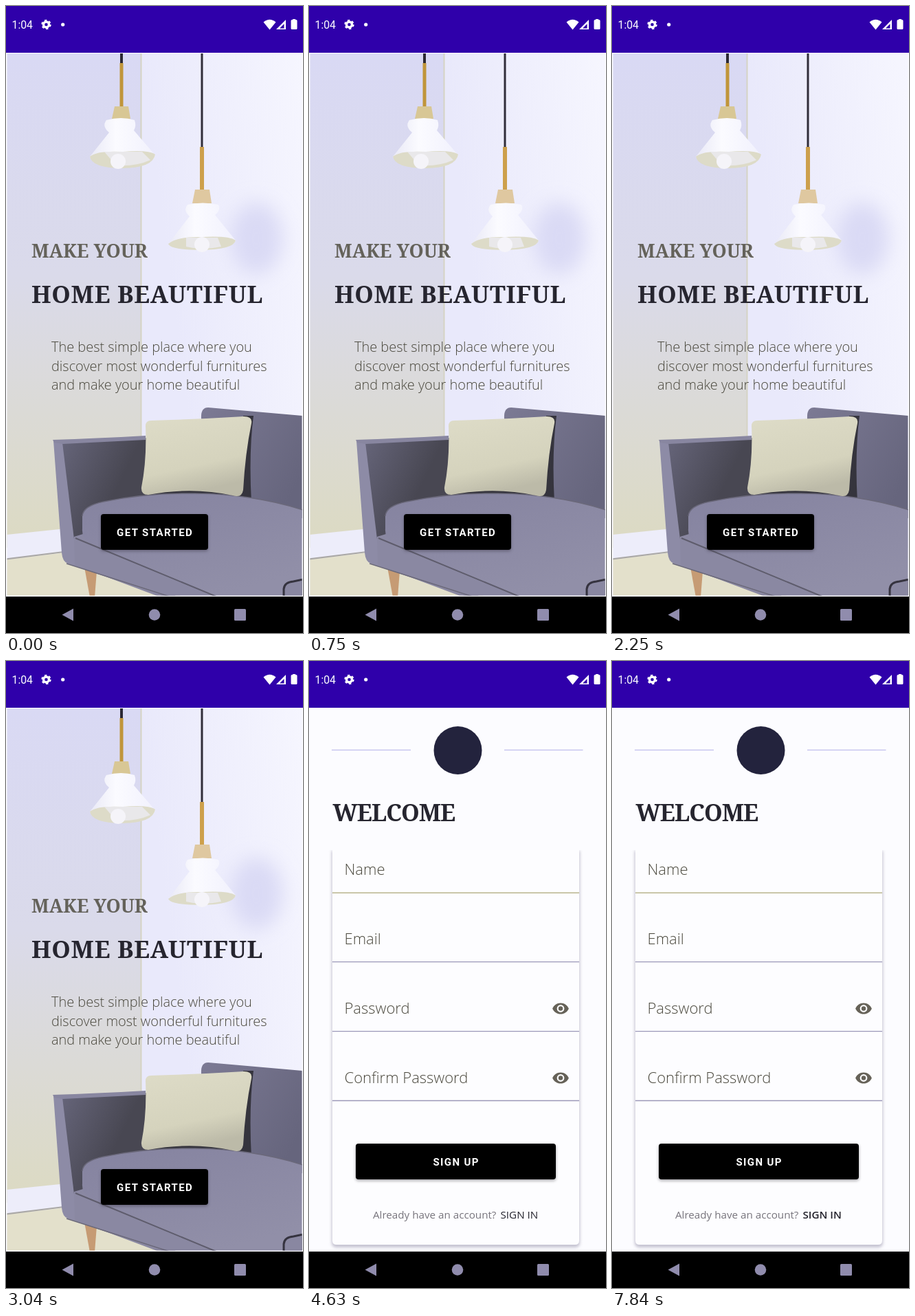
An HTML page that plays this animation: 432 px wide and 912 px high, repeating every 8000 ms.

```html
<!DOCTYPE html>
<html lang="en">
<head>
<meta charset="utf-8">
<title>Home decor app</title>
<style>
  html, body { margin: 0; width: 100%; height: 100%; overflow: hidden; background: #000; }
  svg { display: block; width: 100vw; height: 100vh; }

  .serif { font-family: "Noto Serif", serif; font-weight: 700; fill: #26252f; }
  .light { font-family: "Open Sans", sans-serif; font-weight: 300; fill: #4a483d; }
  .note { font: 400 15.2px "Open Sans", sans-serif; fill: #77747c; }
  .caps { font: 600 15px Roboto, sans-serif; letter-spacing: 1.4px; fill: #fff; text-anchor: middle; }
  .link { fill: #24232c; }

  .signup, .pressed, .bar, .thin, .bold { animation: 8s linear infinite; }
  .signup { animation-name: open; }
  .pressed { animation-name: press; }
  .bar { animation-name: bar; }
  .thin { animation-name: thin; }
  .bold { animation-name: bold; font-weight: 400; }
  .bold .link { font-weight: 600; }

  @keyframes open { 0%, 50% { opacity: 0; } 52%, 100% { opacity: 1; } }
  @keyframes press { 0%, 45.5% { opacity: 0; } 47%, 100% { opacity: 1; } }
  @keyframes bar {
    0%, 74.3% { opacity: 0; }
    74.4%, 91.5% { opacity: 1; }
    97.5%, 100% { opacity: 0; }
  }
  @keyframes thin { 0%, 75.4% { opacity: 1; } 75.5%, 100% { opacity: 0; } }
  @keyframes bold { 0%, 75.4% { opacity: 0; } 75.5%, 100% { opacity: 1; } }
</style>
</head>
<body>
<svg viewBox="0 0 432 912" preserveAspectRatio="none">
  <defs>
    <linearGradient id="wall" x2="0" y2="1">
      <stop offset="0" stop-color="#d9d9f4"/>
      <stop offset=".45" stop-color="#dadaea"/>
      <stop offset="1" stop-color="#dcdac2"/>
    </linearGradient>
    <linearGradient id="side" x2="1" y2="-.4">
      <stop offset="0" stop-color="#e9e9fb"/>
      <stop offset="1" stop-color="#f8f8ff"/>
    </linearGradient>
    <linearGradient id="arm" x2="1" y2=".6">
      <stop offset="0" stop-color="#66657a"/>
      <stop offset=".7" stop-color="#484752"/>
    </linearGradient>
    <linearGradient id="back" x2="1" y2=".6">
      <stop offset="0" stop-color="#7c7a94"/>
      <stop offset="1" stop-color="#66657d"/>
    </linearGradient>
    <linearGradient id="seat" x2=".6" y2="1">
      <stop offset="0" stop-color="#8583a0"/>
      <stop offset="1" stop-color="#918fa8"/>
    </linearGradient>
    <linearGradient id="pillow" x2=".3" y2="1">
      <stop offset="0" stop-color="#dedcc8"/>
      <stop offset=".7" stop-color="#d5d3bd"/>
      <stop offset="1" stop-color="#bcbaa8"/>
    </linearGradient>
    <linearGradient id="shade">
      <stop offset="0" stop-color="#e9e9f6"/>
      <stop offset=".4" stop-color="#fbfbff"/>
      <stop offset="1" stop-color="#f1f1fd"/>
    </linearGradient>
    <filter id="blur" x="-50%" y="-50%" width="200%" height="200%"><feGaussianBlur stdDeviation="14"/></filter>
    <filter id="soft" x="-10%" y="-10%" width="120%" height="130%"><feGaussianBlur stdDeviation="2.2"/></filter>
    <clipPath id="photo"><rect x="1.5" y="69" width="429" height="788.5"/></clipPath>
    <clipPath id="page"><rect y="68" width="432" height="791"/></clipPath>
    <g id="eye" fill="#666258">
      <path fill-rule="evenodd" transform="scale(1.08) translate(-12 -12)" d="M12 4.5C7 4.5 2.73 7.61 1 12c1.73 4.39 6 7.5 11 7.5s9.27-3.11 11-7.5c-1.73-4.39-6-7.5-11-7.5zM12 17a5 5 0 1 1 0-10 5 5 0 0 1 0 10z"/>
      <circle r="3.2"/>
    </g>
  </defs>

  <!-- welcome screen -->
  <rect y="68" width="432" height="791" fill="#fcfcff"/>
  <g clip-path="url(#photo)">
    <rect y="68" width="197" height="720" fill="url(#wall)"/>
    <rect x="196" y="68" width="236" height="720" fill="url(#side)"/>
    <path d="M196.5 68V640" stroke="#d5d3c4" stroke-width="2"/>
    <ellipse cx="364" cy="338" rx="38" ry="52" fill="#dadaf5" filter="url(#blur)"/>

    <!-- hanging lamps -->
    <path d="M168 69V84" stroke="#2b2833" stroke-width="4"/>
    <path d="M168 83V148" stroke="#c0953a" stroke-width="5"/>
    <path d="M158 146H178L181 164H154Z" fill="#d8c795"/>
    <path d="M146 166Q168 160 187 166Q190 174 186 181L217 217Q214 232 170 234Q124 232 122 219L150 184Q139 175 146 166Z" fill="url(#shade)"/>
    <path d="M122 219Q132 210 170 212Q208 209 217 216Q214 235 170 236Q125 236 122 219Z" fill="#dddbc8"/>
    <path d="M143 212H198L210 224Q188 234 160 232Z" fill="#e9e8ea"/>
    <circle cx="163" cy="226" r="11" fill="#f5f4f9"/>

    <path d="M285 69V206" stroke="#302d39" stroke-width="3"/>
    <path d="M285 205V269" stroke="#cda04c" stroke-width="6"/>
    <path d="M275 267H296L299 287H271Z" fill="#dfc8a0"/>
    <path d="M264 289Q286 284 309 289Q313 297 304 304L334 341Q331 353 285 355Q238 353 236 346L267 306Q257 297 264 289Z" fill="url(#shade)"/>
    <path d="M236 346Q249 335 285 336Q325 334 334 341Q331 354 285 355Q240 355 236 346Z" fill="#dddbc8"/>
    <path d="M262 337H308L313 350Q285 356 262 350Z" fill="#e9e8ea"/>
    <circle cx="285" cy="347" r="11" fill="#f5f4f9"/>

    <!-- floor -->
    <path d="M0 769L88 760V860H0Z" fill="#ededfa"/>
    <path d="M0 805L86 795L260 860H0Z" fill="#e3e0cb"/>
    <path d="M0 804.5L84 794" stroke="#aaa8a6" stroke-width="2"/>

    <!-- sofa -->
    <path d="M114 816L132 822L129 860H122Z" fill="#c69b74"/>
    <path d="M284 600Q283 584 294 584L432 596V745H284Z" fill="url(#back)"/>
    <path d="M345 596H360Q353 650 357 722L190 724V690L345 680Z" fill="#35343d"/>
    <path d="M69 632L84 635L112 770L250 860H232L90 811Q82 808 81 795Z" fill="#8d8ba6"/>
    <path d="M82 635L204 628V730L112 775H99Z" fill="url(#arm)"/>
    <path d="M68 631Q130 629 203 625V631L83 637L70 635Z" fill="#8886a0"/>
    <path d="M99 772L112 768L310 860H225L100 813Z" fill="#8a88a2"/>
    <path d="M111 742Q112 727 142 721Q205 708 275 709Q360 710 432 733V860H306L121 780Q110 774 111 760Z" fill="url(#seat)"/>
    <path d="M111 742Q112 727 142 721Q205 708 275 709Q360 710 432 733" fill="none" stroke="#6a687a" stroke-width="1.5"/>
    <path d="M101 774L306 859" stroke="#5e5c6c" stroke-width="2"/>
    <path d="M88 811L238 859" stroke="#6b697a" stroke-width="1.5"/>
    <path d="M404 860V848Q405 838 418 837L432 834V860Z" fill="#8987a1" stroke="#35333f" stroke-width="3"/>
    <path d="M203 611Q203 603 211 603Q280 601 346 597Q359 597 357 607Q348 650 345 704Q343 716 330 712Q270 699 207 711Q196 711 197 700Q205 660 203 611Z" fill="url(#pillow)"/>
  </g>
  <text class="serif" x="37" y="366" style="font-size:27px;font-weight:600;fill:#64625a">MAKE YOUR</text>
  <text class="serif" x="37" y="432" font-size="35" letter-spacing=".7">HOME BEAUTIFUL</text>
  <g class="light" font-size="20" letter-spacing="-.03">
    <text x="66" y="503">The best simple place where you</text>
    <text x="66" y="530.5">discover most wonderful furnitures</text>
    <text x="66" y="558">and make your home beautiful</text>
  </g>
  <rect x="138" y="741" width="156" height="52" rx="4" fill="#3c3a48" opacity=".5" filter="url(#soft)"/>
  <rect x="138" y="739" width="156" height="52" rx="4"/>
  <rect class="pressed" x="138" y="739" width="156" height="52" rx="4" fill="#45434b"/>
  <text class="caps" x="216.7" y="771">GET STARTED</text>

  <!-- sign-up screen -->
  <g class="signup" clip-path="url(#page)">
    <rect y="68" width="432" height="791" fill="#fcfcff"/>
    <path d="M33 129.5H148M284 129.5H398.5" stroke="#c8c5ef" stroke-width="1.6"/>
    <circle cx="216.5" cy="130" r="35" fill="#23233d"/>
    <text class="serif" x="34.5" y="233" font-size="34" letter-spacing="-1">WELCOME</text>

    <path d="M33 276H394V846Q394 853 387 853H40Q33 853 33 846Z" fill="#c4c2d0" filter="url(#soft)"/>
    <path d="M34 266H393V843Q393 849 387 849H40Q34 849 34 843Z" fill="#fdfdff"/>
    <rect x="28" y="255" width="372" height="20" fill="#fcfcff"/>
    <path d="M34 337.2H393" stroke="#b9b58e" stroke-width="1.5"/>
    <path d="M34 437.7H393M34 538.7H393M34 639.5H393" stroke="#9a97b8" stroke-width="1.3"/>
    <g class="light" font-size="22">
      <text x="51.5" y="311">Name</text>
      <text x="51.5" y="412">Email</text>
      <text x="51.5" y="513">Password</text>
      <text x="51.5" y="614">Confirm Password</text>
    </g>
    <use href="#eye" x="366" y="505.5"/>
    <use href="#eye" x="366" y="606.5"/>

    <rect x="68" y="704" width="291" height="52" rx="4" fill="#6a6970" opacity=".6" filter="url(#soft)"/>
    <rect x="68" y="702" width="291" height="52" rx="4"/>
    <text class="caps" x="214.2" y="734">SIGN UP</text>

    <g class="note thin">
      <text x="93" y="811">Already have an account?</text>
      <text class="link" x="278.5" y="810.5">SIGN IN</text>
    </g>
    <g class="note bold">
      <text x="92" y="811">Already have an account?</text>
      <text class="link" x="277.5" y="811">SIGN IN</text>
    </g>
    <rect class="bar" x="426.5" y="69" width="4.5" height="766" fill="#b9b58c"/>
  </g>

  <!-- system bars -->
  <rect width="432" height="68" fill="#2f00aa"/>
  <g fill="#fff">
    <text x="8.5" y="33" font-family="Roboto, sans-serif" font-size="15.8">1:04</text>
    <circle cx="58.5" cy="27" r="4" fill="none" stroke="#fff" stroke-width="3.4"/>
    <circle cx="58.5" cy="27" r="6.1" fill="none" stroke="#fff" stroke-width="2.2" stroke-dasharray="3.2 3.188"/>
    <circle cx="82.7" cy="27" r="2.6"/>
    <path d="M374.5 23.5Q383.5 16 392.5 23.5L383.5 34.5Z"/>
    <path d="M407 20V34H393Z"/>
    <path d="M404.5 26V32.5H398Z" fill="#2f00aa"/>
    <path d="M417 20V19H421V20H422Q423.5 20 423.5 21.5V32.5Q423.5 34 422 34H416Q414.5 34 414.5 32.5V21.5Q414.5 20 416 20Z"/>
  </g>
  <rect y="859.5" width="432" height="52.5"/>
  <g fill="#908cad">
    <path d="M81.500 885.500L98 876.500V894.500Z"/>
    <circle cx="216" cy="885.5" r="8.3"/>
    <rect x="332" y="877" width="17" height="17" rx="1.5"/>
  </g>
</svg>
</body>
</html>
```
